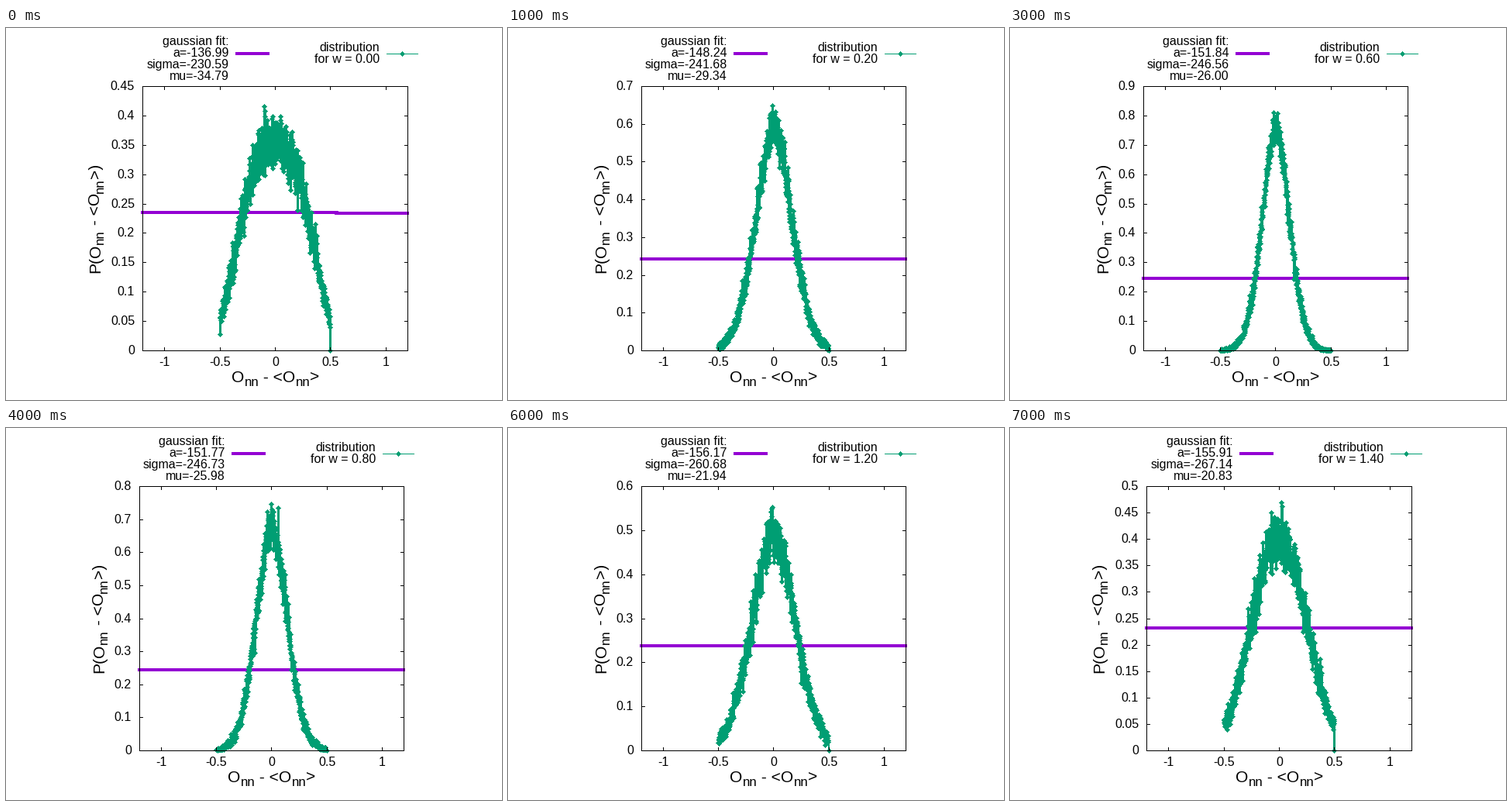
Write a matplotlib script that moves like this. It is 640 px wide and 480 px high and loops after 8000 ms.

```python
import math
import numpy as np
import matplotlib.pyplot as plt
from matplotlib.animation import FuncAnimation
from matplotlib.collections import PolyCollection

DPI = 100
PX = 72 / DPI  # points per pixel
PURPLE, GREEN = "#9400d3", "#009e73"
TOP, BOTTOM = 75, 416
DIAMOND = 2.6 * np.array([(1, 0), (0, 1), (-1, 0), (0, -1)])
# advance widths in em, for placing subscripts
EM = {"P": .667, "(": .333, ")": .333, "O": .778, "n": .556,
      " ": .278, "-": .333, "<": .584, ">": .584}

# fit results at some strengths w
FIT_W = (0, .2, .4, .8, 1.2, 1.4)
FIT_A = (-136.99, -148.24, -151.90, -151.77, -156.17, -155.91)
FIT_SIGMA = (-230.59, -241.68, -246.40, -246.73, -260.68, -267.14)
FIT_MU = (-34.79, -29.34, -26.02, -25.98, -21.94, -20.83)

plt.rcParams["font.family"] = "Liberation Sans"
plt.rcParams["path.simplify"] = False

fig = plt.figure(figsize=(6.4, 4.8), dpi=DPI, facecolor="white")
ax = fig.add_axes([0, 0, 1, 1])


def line(x, y, color="black", width=1, **style):
    ax.plot(x, y, color=color, lw=width * PX, antialiased=False, snap=False,
            **style)


def dotted(x, y):
    line(x, y, GREEN, 1.05)
    centres = np.column_stack([x, y])
    ax.add_collection(PolyCollection(
        centres[:, None] + DIAMOND, facecolor=GREEN, edgecolor="none",
        antialiased=False, snap=False, zorder=2))


def thick(x, y):
    line(x, y, PURPLE, 4)


def text(x, y, s, size=16, **style):
    ax.text(x, y, s, fontsize=size * PX, va="baseline", **style)


def label(parts, x, y, upright=False, size=21):
    """Centred text in which every second part is a subscript."""
    sizes = [size * (.8 if k % 2 else 1) for k in range(len(parts))]
    widths = [s * sum(EM[c] for c in p) for p, s in zip(parts, sizes)]
    pos = -sum(widths) / 2
    for k, (part, s, w) in enumerate(zip(parts, sizes, widths)):
        drop = 5 * (k % 2)
        if upright:
            text(x + drop, y - pos, part, s, rotation=90,
                 rotation_mode="anchor")
        else:
            text(x + pos, y + drop, part, s)
        pos += w


def bell(w):
    """Noisy histogram of nearly constant area, and its highest value."""
    height = np.interp(w, (0, .4, .8, 1.4), (.35, .82, .68, .40))
    power = 1.85 + 1.05 * math.exp(-28 * (height - .35))  # low ones are flat
    area = .26 - .03 * height
    width = area / (2 * height * math.gamma(1 + 1 / power))
    peak = height + .11 * math.sqrt(height)

    x = np.linspace(-.5, .5, 701)
    mean = height * np.exp(-np.abs(x / width) ** power)
    rng = np.random.default_rng(round(10 * w))
    y = np.minimum(rng.poisson(mean * 600) / 600, peak)
    y[-1] = 0
    return x, y, peak


def draw(i):
    w = i * .2
    a, sigma, mu = (np.interp(w, FIT_W, v) for v in (FIT_A, FIT_SIGMA, FIT_MU))
    x, y, peak = bell(w)
    step = .05 if peak < .5 else .1
    rows = math.ceil(peak / step)
    wide = step < .1  # longer tick labels move the plot
    left, right = (176, 518) if wide else (172, 513)
    shift = 0 if wide else -5

    def to_x(v):
        return np.round(left + (np.asarray(v) + 1.2) / 2.4 * (right - left))

    def to_y(v):
        return np.round(BOTTOM - np.asarray(v) / (rows * step) * (BOTTOM - TOP))

    ax.clear()
    ax.set(xlim=(0, 640), ylim=(480, 0))
    ax.axis("off")

    # curves
    u = np.linspace(-1.2, 1.2, 100)
    fit = a / (sigma * np.sqrt(2 * np.pi)) * np.exp(-((u - mu) / sigma) ** 2 / 2)
    thick(to_x(u), to_y(fit))
    dotted(to_x(x) + .5, to_y(y) + .5)

    # frame and ticks
    l, r, t, b = left + .5, right + .5, TOP + .5, BOTTOM + .5
    line([l, r, r, l, l], [b, b, t, t, b])
    for v in (-1, -.5, 0, .5, 1):
        p = to_x(v) + .5
        line([p, p], [b, b - 4])
        line([p, p], [t, t + 4])
        text(p, 436, f"{v:g}", ha="center")
    for k in range(rows + 1):
        p = to_y(k * step) + .5
        line([l, l + 4], [p, p])
        line([r, r - 4], [p, p])
        text(left - 10, p + 4.3, f"{k * step:.4g}", ha="right")

    label(["O", "nn", " - <O", "nn", ">"], 347.8 + shift, 457)
    label(["P(O", "nn", " - <O", "nn", ">)"], 121 - shift, 245.5, upright=True)

    # key
    lines = ["gaussian fit:", f"a={a:.2f}", f"sigma={sigma:.2f}", f"mu={mu:.2f}"]
    for k, s in enumerate(lines):
        text(287.6 + shift, 22 + 15 * k, s, ha="right")
    thick([298 + shift, 338 + shift], [33, 33])
    text(481.8 + shift, 30, "distribution", ha="right")
    text(481.8 + shift, 45, f"for w = {w:.2f}", ha="right")
    line([491.5 + shift, 531.5 + shift], [33.5, 33.5], GREEN)
    dotted([511.5 + shift], [33.5])
    return []


anim = FuncAnimation(fig, draw, frames=8, interval=1000, repeat=True)
plt.show()
```
